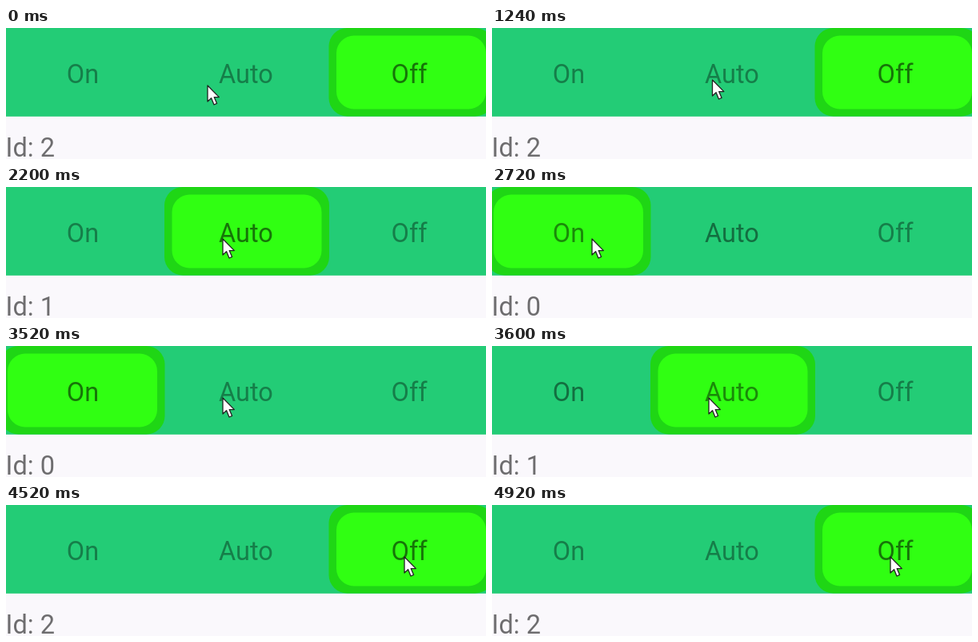
Animation of 600 by 164 pixels, one loop 5 s. Source, as an HTML page:

```html
<!DOCTYPE html>
<html lang="en">
<head>
<meta charset="utf-8">
<title>Segmented switch</title>
<style>
  html, body { margin: 0; width: 100%; height: 100%; overflow: hidden; background: #faf8fc; }
  svg { display: block; width: 600px; height: 164px; }
  text { font: 32.5px Roboto, sans-serif; }
  .label { text-anchor: middle; }
</style>
</head>
<body>
<svg viewBox="0 0 600 164">
  <rect width="600" height="164" fill="#faf8fc"/>
  <rect width="600" height="110.8" fill="#23cc76"/>
  <g id="selector">
    <rect width="206" height="110.5" rx="23" fill="#1fd615"/>
    <rect x="9.5" y="9.5" width="187" height="92" rx="22" fill="#30ff12"/>
  </g>
  <text class="label" x="96" y="69">On</text>
  <text class="label" x="300" y="69">Auto</text>
  <text class="label" x="504" y="69">Off</text>
  <text id="status" x="-.4" y="161" fill-opacity=".56">Id: 2</text>
  <path id="cursor" d="M0 0V20L4.6 15.8 8 24 11.6 22.4 8.2 14.6H14.4Z"
        fill="#fff" stroke="#222" stroke-width="1.3" stroke-linejoin="round"/>
</svg>
<script>
  const LOOP = 5000, STEP = 40, FADE = 80, TRAVEL = 260;
  const DIM = 0.38, STRONG = 0.54;
  const LAST = 2, PITCH = 205.5, LEVEL = 65, BOW = 0.13;

  // Each click selects the next button, from the last to the first and back.
  const clicks = [1680, 2720, 3600, 4440];
  const buttonAfter = count => Math.abs(LAST - count);

  const home = { x: 252, y: 72 };
  const moves = [
    { start: 280, x: 275.5 },
    { start: 1680, x: 271 },
    { start: 2260, x: 125 },
    { start: 3220, x: 271 },
    { start: 3720, x: 498 }
  ];

  const byId = id => document.getElementById(id);
  const selector = byId('selector'), status = byId('status'), cursor = byId('cursor');
  const labels = [...document.querySelectorAll('.label')];

  const clamp = k => Math.min(1, Math.max(0, k));
  const mix = (a, b, k) => a + (b - a) * k;
  const ease = k => k * k * (3 - 2 * k);
  const place = (el, x, y) => el.setAttribute('transform', `translate(${x} ${y})`);

  // Moves run one after another; longer ones sag further below the straight line.
  function pointerAt(t) {
    return moves.reduce((from, { start, x }) => {
      const k = ease(clamp((t - start) / TRAVEL));
      const sag = BOW * Math.abs(x - from.x) * Math.sin(Math.PI * k);
      return { x: mix(from.x, x, k), y: mix(from.y, LEVEL, k) + sag };
    }, home);
  }

  function draw(t) {
    const count = clicks.filter(at => at <= t).length;
    const current = buttonAfter(count), previous = buttonAfter(count - 1);
    const k = count ? clamp((t - clicks[count - 1] + STEP) / FADE) : 1;

    place(selector, (current - 1) * PITCH + 198, 0);
    labels.forEach((label, i) => {
      const weight = i === current ? k : i === previous ? 1 - k : 0;
      label.setAttribute('fill-opacity', mix(DIM, STRONG, weight));
    });
    status.textContent = `Id: ${current}`;

    const { x, y } = pointerAt(t);
    place(cursor, x, y);
  }

  const begin = performance.now();
  function tick() {
    const t = (performance.now() - begin) % LOOP;
    draw(Math.floor(t / STEP) * STEP);
    requestAnimationFrame(tick);
  }
  tick();
</script>
</body>
</html>
```
